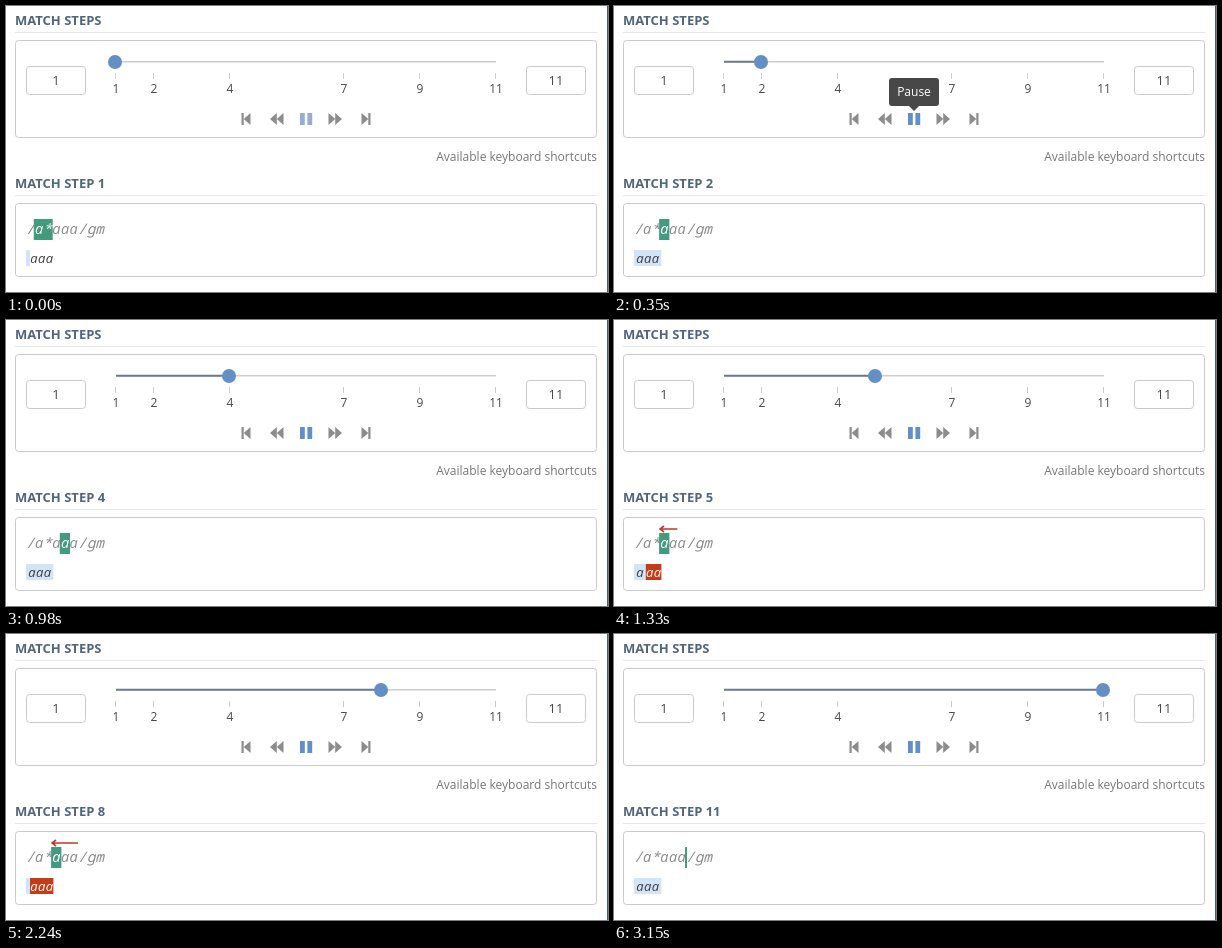
Animation of 602x286 px, one loop 3.5 s. Source, as an HTML page:

```html
<!DOCTYPE html>
<html lang="en">
<head>
<meta charset="utf-8">
<title>Match steps</title>
<style>
  html, body { margin: 0; width: 100%; height: 100%; overflow: hidden; background: #fff; }
  svg { display: block; width: 602px; height: 286px; }
  text { font: 12px "Open Sans", "Noto Sans", sans-serif; fill: #484848; white-space: pre; }
  .title { font-size: 13px; font-weight: 700; fill: #526580; }
  .mid { text-anchor: middle; }
  .box { fill: #fff; stroke: #cacaca; }
  .rule { stroke: #e7e7e7; }
  .mono { text-anchor: middle; font-family: "Noto Sans Mono", monospace; font-style: italic; }
  .mono .a { font-family: "Open Sans", "Noto Sans", sans-serif; }
  #regex { font-size: 14.5px; }
  #subject { font-size: 13px; }
</style>
</head>
<body>
<svg viewBox="0 0 602 286">
  <rect width="602" height="286" fill="#fff"/>
  <path d="M601.5 0V286" stroke="#45616a"/>
  <text class="title" x="9" y="19">MATCH STEPS</text>
  <path class="rule" d="M9 26.5H591M9 189.5H591"/>
  <rect class="box" x="9.5" y="34.5" width="581" height="97" rx="3"/>
  <rect class="box" x="20.5" y="60.5" width="59" height="28" rx="3"/>
  <rect class="box" x="520.5" y="60.5" width="59" height="28" rx="3"/>
  <text class="mid" x="50" y="79" style="font-size:13px">1</text>
  <text class="mid" x="550" y="79" style="font-size:13px">11</text>

  <g id="ticks"></g>
  <path d="M110 55.75H490" stroke="#cdcdcd" stroke-width="1.6"/>
  <path id="done" stroke="#6b7a91" stroke-width="2"/>
  <circle id="knob" cy="56" r="7" fill="#638fc5"/>

  <g fill="#8c8c8c">
    <path id="skip" d="M235.5 107h2.2v12h-2.2zM244.5 107v12l-6.8-6z"/>
    <path id="wind" d="M270.8 107v12l-6.8-6zM277.5 107v12l-6.7-6z"/>
    <use href="#skip" transform="matrix(-1 0 0 1 600 0)"/>
    <use href="#wind" transform="matrix(-1 0 0 1 600 0)"/>
  </g>
  <path id="pause" d="M294 107h4.8v12H294zM301.4 107h4.8v12h-4.8z"/>

  <text x="591" y="155" text-anchor="end" style="fill:#777">Available keyboard shortcuts</text>
  <text id="heading" class="title" x="9" y="182"></text>
  <rect class="box" x="9.5" y="197.5" width="581" height="73" rx="3"/>
  <rect id="token" y="213" height="21" fill="#429b7c"/>
  <path id="arrow" fill="none" stroke="#c0392b" stroke-width="1.6"/>
  <text id="regex" class="mono" y="228"></text>
  <rect id="match" x="20" y="244" height="16" fill="#d3e4f8"/>
  <rect id="back" y="244" height="16" fill="#c53c18"/>
  <text id="subject" class="mono" y="257"></text>

  <g id="tip">
    <path d="M278 72H322q3 0 3 3V97q0 3-3 3H305l-5 5-5-5H278q-3 0-3-3V75q0-3 3-3z" fill="#484848"/>
    <text class="mid" x="300" y="90" style="fill:#fff">Pause</text>
  </g>
</svg>
<script>
const LOOP = 3500, PATTERN = "/a*aaa/gm";
const CELL = 8.67, SMALL = 7.8, LEFT = 20;
const $ = id => document.getElementById(id);

// start time, token start, token length, matched, given back, arrow length in tokens
const steps = [
  [0, 1, 2, 0, 0, 0],
  [350, 3, 1, 3, 0, 0],
  [630, 3, 1, 2, 1, 0],
  [910, 4, 1, 3, 0, 0],
  [1330, 3, 1, 1, 2, 2],
  [1610, 4, 1, 2, 0, 0],
  [1890, 5, 1, 3, 0, 0],
  [2240, 3, 1, 0, 3, 3],
  [2520, 4, 1, 1, 0, 0],
  [2870, 5, 1, 2, 0, 0],
  [3150, 6, 0, 3, 0, 0]
];

function set(id, attrs) {
  for (const key in attrs) $(id).setAttribute(key, attrs[key]);
}

function letter(char, x, fill) {
  const cls = char === "a" ? ' class="a"' : "";
  return `<tspan${cls} x="${x.toFixed(2)}" fill="${fill}" style="fill:${fill}">${char}</tspan>`;
}

$("ticks").innerHTML = [1, 2, 4, 7, 9, 11].map(n => {
  const x = 72 + 38 * n;
  return `<path d="M${x - 0.5} 67v6" stroke="#ccc"/><text class="mid" x="${x}" y="87">${n}</text>`;
}).join("");

let shown = -1;

function showStep(i) {
  if (i === shown) return;
  shown = i;
  const [, start, count, matched, given, reach] = steps[i];
  const knob = 109 + 38 * i;
  const tokenX = LEFT + start * CELL;
  const matchW = 4 + matched * SMALL;

  set("knob", { cx: knob });
  set("done", { d: `M110 55.75H${Math.max(110, knob)}` });
  $("heading").textContent = "MATCH STEP " + (i + 1);
  set("token", {
    x: count ? tokenX - 0.9 : tokenX - 1,
    width: count ? count * CELL + 1.6 : 2
  });
  set("arrow", {
    d: reach ? `M${tokenX} 209H${tokenX + reach * CELL}M${tokenX + 4} 206l-4 3 4 3` : ""
  });
  $("regex").innerHTML = [...PATTERN].map((c, k) => {
    const lit = k >= start && k < start + count;
    return letter(c, LEFT + (k + 0.5) * CELL, lit ? "#fff" : "#8a8a8a");
  }).join("");

  set("match", { width: matchW });
  set("back", { x: LEFT + matchW, width: given * SMALL });
  $("subject").innerHTML = [..."aaa"].map((c, k) => {
    const pad = k < matched ? 2 : 4;
    const red = k >= matched && k < matched + given;
    return letter(c, LEFT + pad + (k + 0.5) * SMALL, red ? "#fff" : "#3c3c3c");
  }).join("");
}

function draw(t) {
  showStep(steps.filter(s => s[0] <= t).length - 1);
  set("tip", { opacity: t < 70 || t >= 490 ? 0 : t < 140 ? 0.55 : 1 });
  set("pause", { fill: t < 70 ? "#94afd6" : t < 140 ? "#789cce" : "#628fc9" });
}

const origin = performance.now();
function tick() {
  draw((performance.now() - origin) % LOOP);
  requestAnimationFrame(tick);
}
draw(0);
requestAnimationFrame(tick);
</script>
</body>
</html>
```
